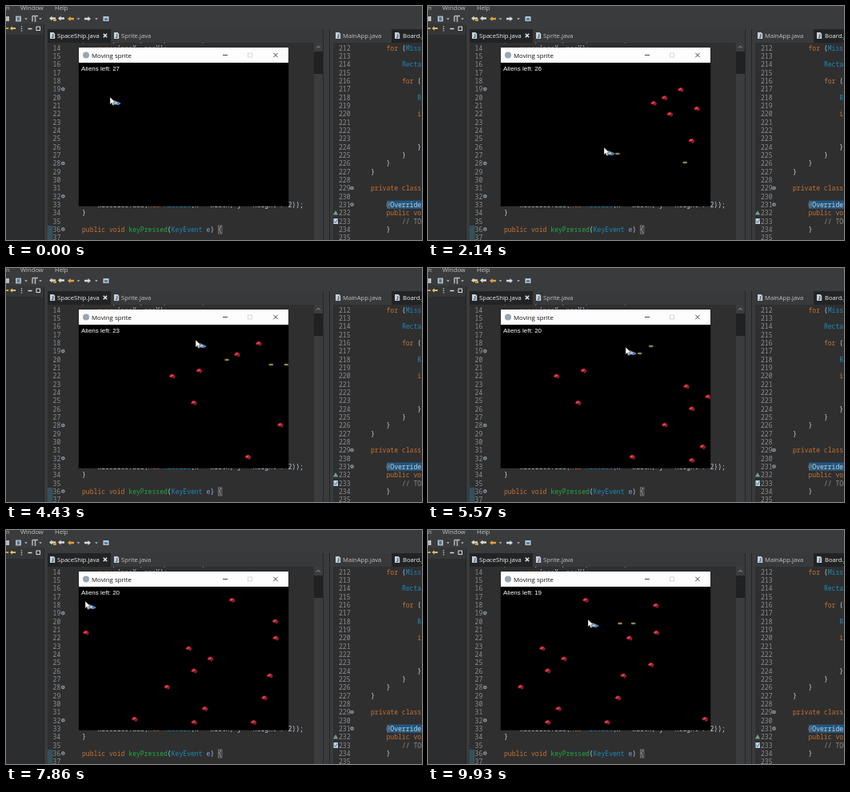
An HTML page for the animation above (10000 ms loop, 520 by 293 pixels).

```html
<!DOCTYPE html>
<html lang="en">
<head>
<meta charset="utf-8">
<title>Moving sprite</title>
<style>
html, body { margin: 0; width: 100%; height: 100%; overflow: hidden; background: #2f2f30; }
svg { display: block; width: 100vw; height: 100vh; }
text { white-space: pre; }
.ui { font: 7.65px "Open Sans", "Noto Sans", sans-serif; fill: #c4c4c4; }
.code { font: 8.1px "Noto Sans Mono", "DejaVu Sans Mono", monospace; fill: #c6d0da; }
.num { fill: #8b8f92; text-anchor: end; }
.label { font: 8px "Liberation Sans", Arial, sans-serif; fill: #fff; }
.kw { fill: #c6722e; }
.type { fill: #1c8ab8; }
.fn { fill: #22aa42; }
.arg { fill: #76a2ea; }
.note { fill: #8c8c8c; }
</style>
</head>
<body>
<svg viewBox="0 0 520 293" xmlns="http://www.w3.org/2000/svg">
  <defs>
    <clipPath id="board"><rect x="91" y="71" width="262" height="179.500"/></clipPath>
    <g id="alien">
      <path d="M-4 0L-1.500-2.800 1.200-3 3.700-.6 3.500 1.800 1 3 .2 1.300-2 1.600Z" fill="#a81f2c"/>
      <path d="M-3 0L-.8-1.800 1.500-1.600 0 .2Z" fill="#e2525c"/>
      <path d="M.4.6L2.600.2 2 1.800Z" fill="#4d1016"/>
    </g>
    <g id="shot">
      <rect x="-2.800" y="-1.300" width="5.600" height="2.600" rx=".8" fill="#766c35"/>
      <rect x="-1.800" y="-.6" width="3.400" height="1.100" fill="#aa9c5b"/>
    </g>
    <g id="doc">
      <path d="M-3-4H1.500L3.200-2.200V4H-3Z" fill="#c9ced4"/>
      <path d="M.8-2V1.800Q.6 2.800-1 2.300" fill="none" stroke="#39699b" stroke-width="1.200"/>
    </g>
    <g id="fold">
      <circle r="2.300" fill="#8f9aa2"/>
      <path d="M-1.300 0H1.300M0-1.300V1.300" stroke="#3a4248" stroke-width=".7"/>
    </g>
    <path id="drop" d="M-1.800-.8H1.800L0 1.200Z" fill="#c2c2c2"/>
    <path id="arrow" d="M-4 0L-.5-3V-1.200H4V1.200H-.5V3Z"/>
  </defs>

  <rect width="520" height="293" fill="#2f2f30"/>
  <g id="text"></g>

  <!-- toolbar and side panel -->
  <rect width="520" height="29" fill="#3a3b3c"/>
  <rect y="22" width="48" height="14" fill="#353637"/>
  <rect y="36" width="48" height="257" fill="#2c2d2e"/>
  <rect x="47.500" y="24" width="4.500" height="269" fill="#3a3b3c"/>
  <path d="M47.500 24V293" stroke="#222324"/>
  <g class="ui">
    <text x="0" y="5">n</text><text x="18" y="5">Window</text><text x="61" y="5">Help</text>
  </g>
  <g>
    <rect x="0" y="13" width="4" height="6" fill="#b9bcc0"/>
    <rect x="12" y="12.500" width="7" height="7" fill="#a9b2ba"/><rect x="14" y="14" width="3" height="4" fill="#4f789f"/>
    <use href="#drop" x="25" y="16"/>
    <path d="M33 12.500H40M33 12.500V19.500M36.500 13V20" stroke="#b4bac0" stroke-width="1.500"/>
    <use href="#drop" x="43" y="16"/>
    <use href="#arrow" x="58" y="15.500" fill="#d9d6c5"/><rect x="59" y="16" width="4" height="3" fill="#c79b40"/>
    <use href="#arrow" transform="translate(69 15.500)" fill="#dadada"/>
    <use href="#arrow" x="81" y="16" fill="#dfa13d"/><use href="#drop" x="90.500" y="16"/>
    <use href="#arrow" transform="translate(102 16) scale(-1 1)" fill="#d8d8d8"/><use href="#drop" x="113" y="16"/>
    <rect x="121.500" y="13" width="7" height="6" fill="#bcc8d0"/><rect x="123" y="15" width="4" height="3" fill="#4b87a8"/>
    <use href="#arrow" transform="translate(0 28) scale(.8)" fill="#d5a044"/>
    <use href="#arrow" transform="translate(8.500 28) scale(.9)" fill="#d9bd6a"/>
    <path d="M19.500 25.200V31.500" stroke="#ccc" stroke-width="1.400" stroke-dasharray="1.300 1.200"/>
    <path d="M27.500 28.500H32.500" stroke="#ddd" stroke-width="1.500"/>
    <rect x="38" y="26" width="4.500" height="4.500" fill="none" stroke="#ddd"/>
  </g>

  <!-- tabs -->
  <rect x="52" y="29" width="344" height="17" fill="#38393a"/>
  <rect x="52" y="29" width="79" height="17" fill="#222324"/>
  <rect x="396" y="29" width="13" height="264" fill="#3a3b3c"/>
  <path d="M396.500 29V293M404.500 29V293" stroke="#252627"/>
  <rect x="409" y="29" width="111" height="17" fill="#38393a"/>
  <rect x="482" y="29" width="38" height="17" fill="#222324"/>
  <use href="#doc" x="58" y="37"/><use href="#doc" x="138" y="37"/>
  <use href="#doc" x="415" y="37"/><use href="#doc" x="489" y="37"/>
  <g class="ui">
    <text x="64" y="40" fill="#fff" style="fill:#f0f0f0">SpaceShip.java</text>
    <text x="144" y="40">Sprite.java</text>
    <text x="421" y="40">MainApp.java</text>
    <text x="496" y="40" style="fill:#f0f0f0">Board.java</text>
  </g>
  <path d="M121.800 34.800L126.200 39.200M126.200 34.800L121.800 39.200" stroke="#e8e8e8" stroke-width="1.500"/>

  <!-- scrollbar -->
  <rect x="385" y="46" width="11" height="247" fill="#3b3c3d"/>
  <rect x="385" y="57" width="11" height="28" fill="#202122"/>
  <path d="M388.300 52.500L390.500 50.200 392.700 52.500" fill="none" stroke="#a2a2a2"/>

  <!-- game window -->
  <rect x="90.500" y="51.500" width="263" height="199.500" fill="#1c1c1c"/>
  <rect x="91" y="52" width="262" height="19" fill="#fdfdfd"/>
  <rect x="91" y="71" width="262" height="179.500" fill="#000"/>
  <circle cx="100" cy="61.500" r="4" fill="#9aa5b2"/>
  <text x="107" y="64.500" class="ui" style="font-size:7.9px;fill:#151515">Moving sprite</text>
  <path d="M271 61.500H277" stroke="#333" stroke-width=".9"/>
  <rect x="302.500" y="59" width="5" height="5" fill="none" stroke="#cfcfcf" stroke-width=".8"/>
  <path d="M334.300 58.800L339.700 64.200M339.700 58.800L334.300 64.200" stroke="#333" stroke-width=".9"/>
  <text id="count" x="94" y="81" class="label"></text>
  <g clip-path="url(#board)">
    <g id="aliens"></g>
    <g id="shots"></g>
    <g id="ship">
      <path d="M-5.500-3.200L-1-2.500 5.500.2 6.200 1.800 2 3-5 2.800-4 .5Z" fill="#a9c3d6"/>
      <path d="M-5.500-3.200L-1.500-2.600 0-.8-4-.2Z" fill="#4f8c5a"/>
      <path d="M0-1.500L6 .6 6.300 1.900 2 2.300Z" fill="#3f7fd0"/>
      <path d="M-5 1.200L1 1.400 2.500 3-5 2.900Z" fill="#51606d"/>
      <path d="M-3 0L2 .4" stroke="#f0f5f8"/>
    </g>
  </g>
  <path id="cursor" d="M0 0V9.200L2.200 7.300 3.700 10.600 5.200 9.900 3.800 6.700H6.800Z" fill="#fff" stroke="#222" stroke-width=".5"/>
</svg>
<script>
const NS = 'http://www.w3.org/2000/svg';
const $ = id => document.getElementById(id);
function add(parent, tag, attrs, text) {
  const el = document.createElementNS(NS, tag);
  for (const k in attrs) el.setAttribute(k, attrs[k]);
  if (text) el.textContent = text;
  parent.appendChild(el);
  return el;
}

// ---- editor text ----
const page = $('text');
const COL = 4.86;
const rowY = row => 53 + row * 10.32;

// Segments are split by "|"; a leading "k:", "t:", "f:", "a:" or "n:" picks a colour.
const styles = { k: 'kw', t: 'type', f: 'fn', a: 'arg', n: 'note' };
function line(x, row, src) {
  const el = add(page, 'text', { x, y: rowY(row) + 2.8, class: 'code' });
  for (const part of src.split('|')) {
    const m = /^([ktfan]):(.*)$/.exec(part);
    add(el, 'tspan', m ? { class: styles[m[1]] } : {}, m ? m[2] : part);
  }
}
function numbers(first, x) {
  for (let i = 0; i < 24; i++)
    add(page, 'text', { x, y: rowY(i) + 2.8, class: 'code num' }, String(first + i));
}
function fold(x, row) {
  add(page, 'use', { href: '#fold', x, y: rowY(row) - .5 });
}

add(page, 'rect', { x: 52, y: 275, width: 6.5, height: 18, fill: '#34515c' });
add(page, 'rect', { x: 476, y: 243.5, width: 44, height: 10.5, fill: '#21577f' });
add(page, 'rect', { x: 265.3, y: 275, width: 4.6, height: 10, fill: 'none', stroke: '#a5a5a5', 'stroke-width': .6 });
numbers(14, 68.3);
numbers(212, 430.5);
[5, 14, 18, 22].forEach(r => fold(71.3, r));
[17, 19].forEach(r => fold(432.5, r));
add(page, 'path', { d: 'M408.800 261.500L412 256 415.200 261.500Z', fill: '#6fa287' });
add(page, 'rect', { x: 409.5, y: 266, width: 5.5, height: 7, fill: '#c3d2dc' });
add(page, 'path', { d: 'M410.500 269.500L412 271.500 414.500 267', fill: 'none', stroke: '#417ca5' });

const left = 95, tab = COL * 4;
line(left, -1, 'k:public |SpaceShip(|k:int |a:posX|, |k:int |a:posY|) {');
line(left + tab, 0, 'k:super|(posX, posY);');
line(left + tab, 19, 'missiles.add(|k:new |t:Missile|(x + width, y + height / 2));');
line(left, 20, '}');
line(left, 22, 'k:public void |f:keyPressed|(|t:KeyEvent| |a:e|) {');

const right = 456;
const at = (depth, row, src) => line(right + depth * tab, row, src);
at(1, 0, 'k:for |(|t:Missile');
at(2, 2, 't:Rectangle');
at(2, 4, 'k:for |(');
at(3, 6, 't:Rectangle');
at(3, 8, 'k:if');
[3, 2, 1, 0].forEach((d, i) => at(d, 12 + i, '}'));
at(0, 17, 'k:private class');
at(1, 19, 'n:@|Override');
at(1, 20, 'k:public void');
at(2, 21, 'n:// TODO');
at(1, 22, '}');

// ---- game ----
const LOOP = 10000, FPS = 14, TOTAL = 27;
const ALIEN_V = 41.3, SHOT_V = 83, WRAP = 271;

// board x, board y, time of the hit
const aliens = [
  [490, 170, 1800], [510, 70, 3030], [530, 60, 3240], [560, 45, 3900],
  [660, 50, 4500], [700, 30, 5000], [760, 50, 5430], [980, 209, 9800],
  [940, 59, 9920], [540, 90], [590, 80], [580, 139], [680, 239], [740, 180],
  [780, 109], [820, 128], [790, 150], [810, 220], [790, 245], [860, 20],
  [900, 245], [930, 159], [920, 200], [990, 30]
].map(([x, y, hit = Infinity]) => ({ x: 282 + (x - 510) * .676, y: 74.4 + y * .68, hit }));

// time, x, y
const path = [
  [0, 137, 121], [400, 145, 126], [1000, 225, 186], [1150, 230, 195],
  [1300, 228, 190], [2130, 227, 184], [2650, 205, 121], [2850, 209, 117],
  [3100, 231, 120], [3330, 231, 120], [3750, 221, 105], [4140, 243, 114],
  [4430, 244, 97], [4480, 244, 96], [4700, 249, 107], [5380, 254, 97],
  [5550, 254, 106], [5650, 254, 106], [6350, 97, 97], [7600, 97, 97],
  [8570, 151, 91], [8720, 151, 91], [9100, 215, 215], [9440, 207, 116],
  [9640, 207, 116], [9880, 207, 119]
];
function shipAt(t) {
  const i = path.findIndex(p => p[0] > t);
  if (i < 0) return path[path.length - 1].slice(1);
  const [t0, x0, y0] = path[i - 1], [t1, x1, y1] = path[i];
  const k = (1 - Math.cos(Math.PI * (t - t0) / (t1 - t0))) / 2;
  return [x0 + (x1 - x0) * k, y0 + (y1 - y0) * k];
}

// fired, stopped by a hit
const shots = [
  [1150], [1300, 1800], [2130], [2650, 3030], [2850, 3240], [3100], [3330],
  [3750, 3900], [4140, 4500], [4480, 5000], [4700, 5430], [5380], [5550],
  [9100, 9800], [9440], [9640]
].map(([from, to = Infinity]) => {
  const [x, y] = shipAt(from);
  return { x: x + 9, y: y + 1, from, to };
});

for (const a of aliens) a.el = add($('aliens'), 'use', { href: '#alien' });
for (const s of shots) s.el = add($('shots'), 'use', { href: '#shot' });

function place(el, x, y, shown = true) {
  el.setAttribute('transform', `translate(${x.toFixed(2)} ${y.toFixed(2)})`);
  el.setAttribute('visibility', shown ? 'visible' : 'hidden');
}

function render(t) {
  let hits = 0;
  for (const a of aliens) {
    let x = a.x - ALIEN_V * (t - 2140) / 1000;
    if (x < 97) x += WRAP;
    place(a.el, x, a.y, t < a.hit);
    if (t > a.hit + 60) hits++;
  }
  for (const s of shots)
    place(s.el, s.x + SHOT_V * (t - s.from) / 1000, s.y, t >= s.from && t < s.to);
  const [x, y] = shipAt(t);
  place($('ship'), x, y);
  place($('cursor'), x - 7, y - 7, x > 100);
  $('count').textContent = 'Aliens left: ' + (TOTAL - hits);
}

const stepTime = n => Math.round(n * 100 / FPS) * 10;
function tick() {
  const t = performance.now() % LOOP;
  let n = Math.floor(t * FPS / 1000);
  if (stepTime(n + 1) <= t) n++;
  if (stepTime(n) > t) n--;
  render(stepTime(n));
  requestAnimationFrame(tick);
}
tick();
</script>
</body>
</html>
```
